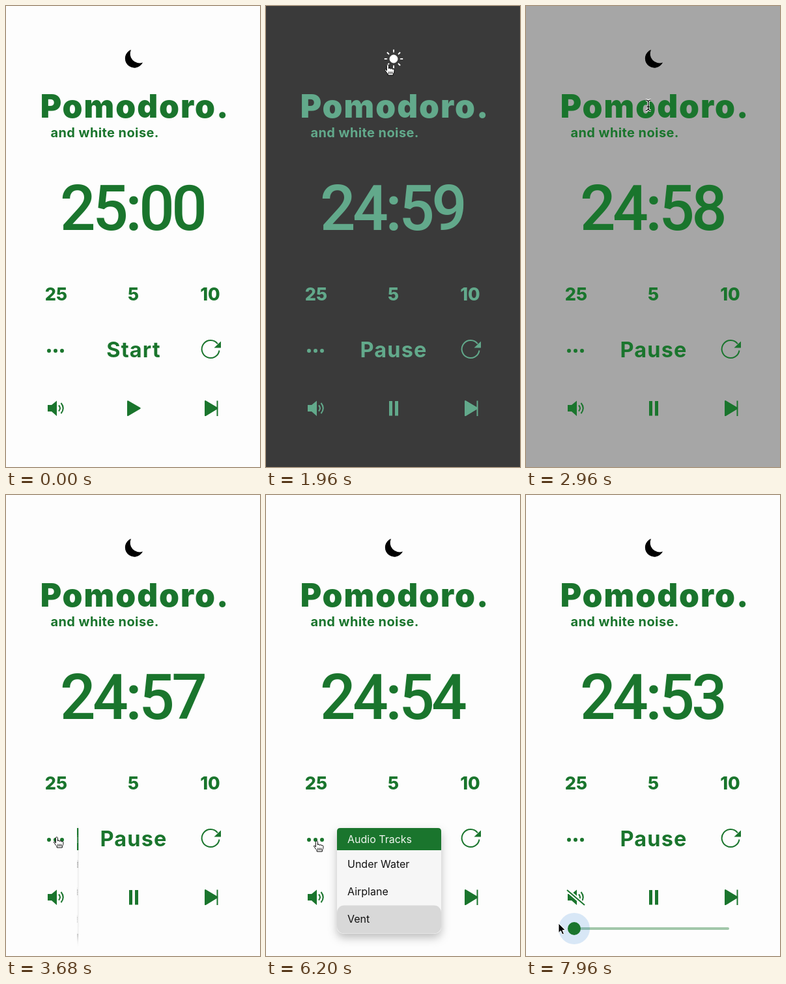
These frames come from a looping animation (390 px wide and 706 px high, 8 s). An HTML page:

```html
<!DOCTYPE html>
<html lang="en">
<head>
<meta charset="utf-8">
<title>Pomodoro</title>
<style>
  html, body { margin: 0; width: 100%; height: 100%; overflow: hidden; }
  svg { display: block; width: 100%; height: 100%; color: #1a752d; }
  text { font-family: Inter, sans-serif; fill: currentColor; }
  .mid { text-anchor: middle; }
  .solid { fill: currentColor; }
  .line { fill: none; stroke: currentColor; stroke-width: 2; }
  .round { fill: currentColor; stroke: currentColor; stroke-width: 2.4; stroke-linejoin: round; }
  #title { font-size: 49.5px; font-weight: 900; letter-spacing: 2px; }
  #subtitle { font-size: 20px; font-weight: 700; letter-spacing: .4px; }
  #time { font: 500 96px Roboto, sans-serif; letter-spacing: -4.5px; }
  .preset { font-size: 27px; font-weight: 800; }
  #action { font-size: 32.5px; font-weight: 700; letter-spacing: 1.1px; }
  #menu { filter: drop-shadow(0 6px 7px rgba(0, 0, 0, .25)); }
  #menu text { font-size: 16px; fill: #111; }
  #menu .head { fill: #f1f6f0; }
  #cursor path { stroke: #000; fill: #fff; stroke-linejoin: round; }
</style>
</head>
<body>
<svg id="stage" viewBox="0 0 390 706">
  <rect id="page" width="390" height="706"/>

  <path id="moon" class="button" d="M192 67A14.3 14.3 0 1 0 210 86.5A14.3 14.3 0 0 1 192 67Z"/>
  <g id="sun" class="button" fill="#fff" stroke="#fff">
    <circle cx="196" cy="81" r="6"/>
    <circle cx="196" cy="81" r="12" fill="none" stroke-width="4.4" pathLength="80" stroke-dasharray="2 8" stroke-dashoffset="1"/>
  </g>

  <text class="mid copy" id="title" x="198" y="171">Pomodoro.</text>
  <text class="mid copy" id="subtitle" x="151.7" y="201">and white noise.</text>
  <text class="mid copy" id="time" x="193.7" y="343"></text>
  <text class="mid preset button" x="77" y="451">25</text>
  <text class="mid preset button" x="195.5" y="451">5</text>
  <text class="mid preset button" x="313.5" y="451">10</text>

  <path class="button" d="M66 528H86.1" stroke="currentColor" stroke-width="6" stroke-linecap="round" stroke-dasharray="0 10"/>
  <text class="mid button" id="action" x="196" y="538"></text>
  <g class="button">
    <path class="line" d="M327.5 527.5A13.5 13.5 0 1 1 325 517.5"/>
    <path class="solid" d="M330 513.5V523.5H319.5Z"/>
  </g>

  <path class="solid button" d="M64 611H70L78 604.5V628L70 621H64Z"/>
  <path class="line" d="M81 611.5Q85 616 81 620.5M84.5 608Q91 616 84.5 624"/>
  <g id="slash">
    <path d="M63 605L90 628" stroke="#fdfdfd" stroke-width="6"/>
    <path class="line" d="M63 605L90 628"/>
  </g>
  <path id="play" class="round button" d="M187.2 605.5L205.5 616L187.2 626.8Z"/>
  <path id="pause" class="solid button" d="M189 605H194V627.5H189ZM198 605H203V627.5H198Z"/>
  <use href="#triangle"/>
  <path id="triangle" class="round button" d="M306.2 605.5L324 616L306.2 626.8Z"/>
  <path class="line" d="M324.5 604.5V628"/>

  <g id="slider">
    <rect class="solid button" x="72" y="662" width="240" height="4" rx="2" opacity=".4"/>
    <rect id="level" class="solid" x="72" y="662" height="4" rx="2"/>
    <circle id="halo" cy="664" fill="#1976d2" fill-opacity=".16"/>
    <circle id="thumb" class="solid" cy="664" r="10"/>
  </g>

  <g id="menu">
    <rect class="button" x="109" y="510" width="160" height="162" rx="10" fill="#f6f6f6"/>
    <path class="solid" d="M109 544V515Q109 510 114 510H264Q269 510 269 515V544Z"/>
    <rect id="hover" x="109" width="160" height="43" rx="11" fill="#d8d8d8"/>
    <text class="head" x="125" y="533">Audio Tracks</text>
    <text x="125" y="571">Under Water</text>
    <text x="125" y="613">Airplane</text>
    <text x="125" y="655">Vent</text>
  </g>

  <g id="cursor">
    <path id="arrow" style="fill:#000;stroke:#fff" d="M0 0V14.5L3.4 11.4L5.8 17L8.4 15.9L6 10.5H10.5Z"/>
    <g id="hand">
      <path d="M-1.7 9V1.5C-1.7-.6 1.4-.6 1.4 1.5V6C2 4.4 4.6 4.6 4.6 6.6C5.4 5 7.6 5.4 7.5 7.2C8.4 6 10 6.6 10 8.4C10 11.5 9 12.5 8.3 14V16H.2V14C-2 11.8-2.8 10.2-4.4 8.4C-5.2 7-3.2 6-1.7 9Z"/>
      <path d="M1.8 10.5V14M4.2 10.5V14M6.6 10.5V14"/>
    </g>
    <g id="beam">
      <path style="fill:none;stroke:#fff;stroke-width:3.4" d="M-4-8Q0-8 0-5Q0-8 4-8M0-5V5M-4 8Q0 8 0 5Q0 8 4 8M-2 2H2"/>
      <path style="fill:none;stroke-width:1.3" d="M-4-8Q0-8 0-5Q0-8 4-8M0-5V5M-4 8Q0 8 0 5Q0 8 4 8M-2 2H2"/>
    </g>
  </g>
</svg>
<script>
  const LOOP = 8000;
  const $ = id => document.getElementById(id);
  const clamp = (v, lo, hi) => Math.min(hi, Math.max(lo, v));
  const mix = (a, b, p) => a + (b - a) * p;
  const smooth = (t, start, length) => {
    const p = clamp((t - start) / length, 0, 1);
    return p * p * (3 - 2 * p);
  };
  const show = (id, on) => $(id).setAttribute('display', on ? 'inline' : 'none');
  const set = (id, attrs) => {
    for (const name in attrs) $(id).setAttribute(name, attrs[name]);
  };

  // Clicks along the way, in ms
  const START = 150, PLAY = 860, DARK = 1700, LIGHT = 2827,
        OPEN = 3660, PICK = 4640, CLOSE = 6370, VOLUME = 6740, GRAB = 7200;
  const FIRST_TICK = 1120, FADE = 250, GLIDE = 400;
  const RAIL = 74, FULL = 240.6;

  // Pointer arrivals: it rests at each place, then glides to the next
  const route = [
    { at: 40, x: 15, y: 150 },
    { at: START, x: 192, y: 522 },
    { at: 740, x: 196, y: 611 },
    { at: 1260, x: 355, y: 420 },
    { at: 1600, x: 187, y: 90 },
    { at: 3100, x: 188, y: 176 },
    { at: 3560, x: 78, y: 524 },
    { at: 4080, x: 150, y: 568 },
    { at: PICK, x: 170, y: 645 },
    { at: 5500, x: 14, y: 580 },
    { at: 6180, x: 78, y: 530 },
    { at: 6700, x: 78, y: 611 },
    { at: 7150, x: 240, y: 662 },
    { at: 7760, x: 50, y: 656 }
  ];

  function pointerAt(t) {
    return route.reduce((from, to) => {
      const length = Math.min(GLIDE, to.at - from.at);
      const p = smooth(t, to.at - length, length);
      return { at: to.at, x: mix(from.x, to.x, p), y: mix(from.y, to.y, p) };
    });
  }

  function cursorShape(x, y) {
    const margin = 6;
    const over = selector => [...document.querySelectorAll(selector)].some(el => {
      const box = el.getBBox();
      return !el.closest('[display=none]') &&
        x > box.x - margin && x < box.x + box.width + margin &&
        y > box.y - margin && y < box.y + box.height + margin;
    });
    return over('.button') ? 'hand' : over('.copy') ? 'beam' : 'arrow';
  }

  function draw(t) {
    const dark = t >= DARK && t < LIGHT;
    const shade = smooth(t, DARK, FADE) - smooth(t, LIGHT, FADE);
    const level = Math.round(mix(253, 58, shade));
    $('page').setAttribute('fill', `rgb(${level},${level},${level})`);
    $('stage').style.color = dark ? '#62a98b' : '#1a752d';
    show('moon', !dark);
    show('sun', dark);

    const ticks = Math.max(0, Math.floor((t - FIRST_TICK) / 1000) + 1);
    $('time').textContent = ticks ? `24:${60 - ticks}` : '25:00';
    $('action').textContent = t < START ? 'Start' : 'Pause';
    show('play', t < PLAY);
    show('pause', t >= PLAY);

    const { x, y } = pointerAt(t);
    const width = smooth(t, OPEN, 300) - smooth(t, CLOSE, FADE);
    show('menu', width > 0);
    set('menu', { transform: `translate(109 0) scale(${width} 1) translate(-109 0)` });
    const overItem = x > 109 && x < 269 && y > 544 && y < 670;
    const row = overItem ? Math.floor((y - 544) / 42) : 2;
    show('hover', overItem || t >= PICK);
    set('hover', { y: 544.5 + row * 42 });

    const knob = t < GRAB ? FULL : clamp(x, RAIL, FULL);
    const near = Math.hypot(x - knob, y - 664) < 12;
    show('slider', t >= VOLUME);
    set('level', { width: knob - 72 });
    set('thumb', { cx: knob });
    set('halo', { cx: knob, r: t >= GRAB ? 24 : near ? 18 : 0 });
    show('slash', knob <= RAIL);

    const shape = cursorShape(x, y);
    ['arrow', 'hand', 'beam'].forEach(id => show(id, id === shape));
    show('cursor', t >= 40);
    set('cursor', { transform: `translate(${x} ${y})` });
  }

  function frame() {
    draw(performance.now() % LOOP);
    requestAnimationFrame(frame);
  }
  frame();
</script>
</body>
</html>
```
